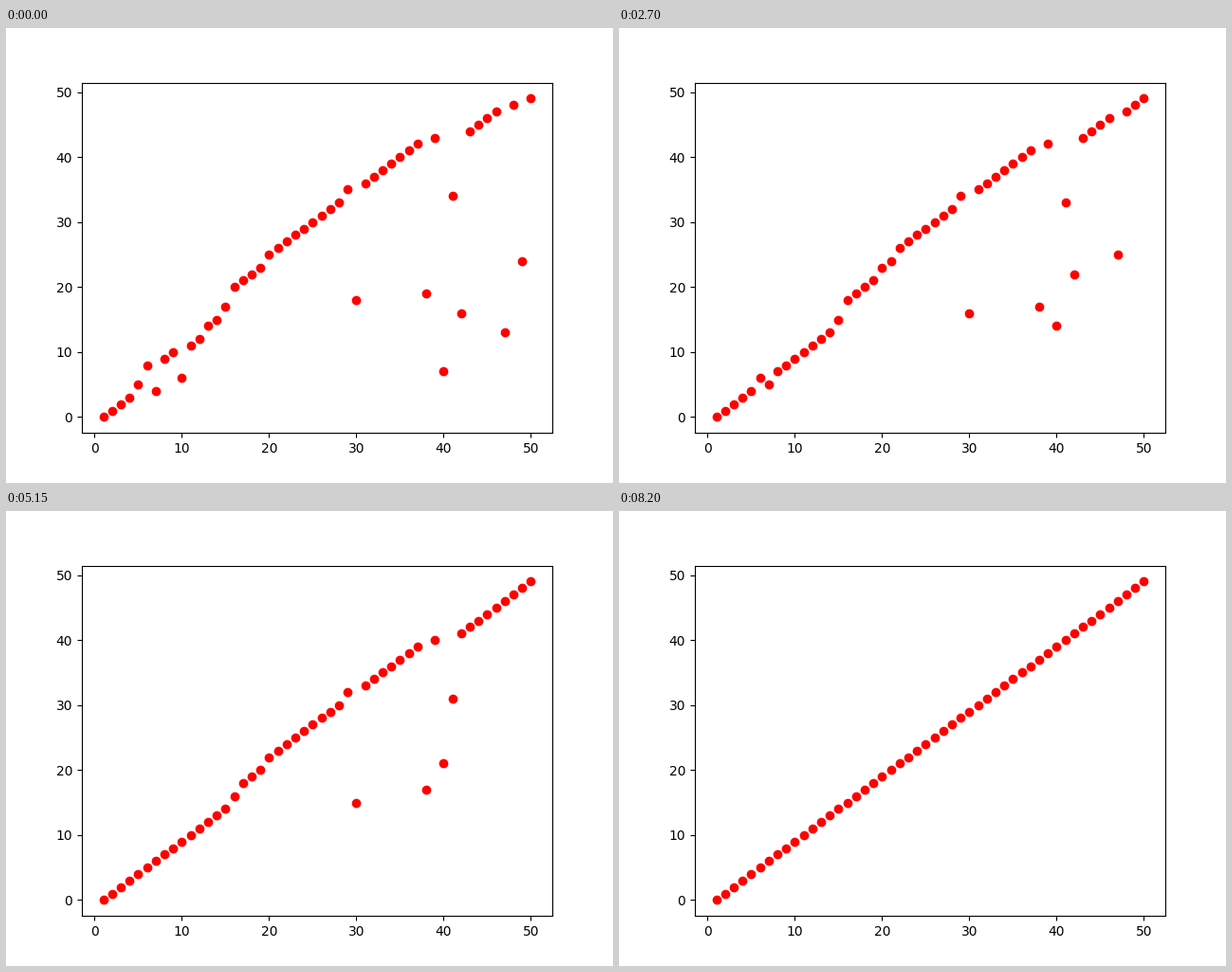
A matplotlib script for the animation above (8250 ms loop, 640 by 480 pixels).

```python
import matplotlib.pyplot as plt
from matplotlib.animation import FuncAnimation

N = 50
# Items out of order at the start: value -> position
STRAYS = {7: 4, 10: 6, 40: 7, 47: 13, 42: 16, 30: 18, 38: 19, 49: 24, 41: 34}


def start_order():
    items = [v for v in range(1, N + 1) if v not in STRAYS]
    for value, pos in sorted(STRAYS.items(), key=lambda s: s[1]):
        items.insert(pos, value)
    return items


def bubble_states(items):
    """Every state of a bubble sort, one swap apart."""
    items = list(items)
    states = [items[:]]
    for end in range(len(items) - 1, 0, -1):
        for j in range(end):
            if items[j] > items[j + 1]:
                items[j], items[j + 1] = items[j + 1], items[j]
                states.append(items[:])
    return states


states = bubble_states(start_order())

fig, ax = plt.subplots(figsize=(6.4, 4.8), dpi=100)
dots, = ax.plot(states[0], range(N), "ro")


def update(i):
    dots.set_data(states[i], range(N))
    return dots,


anim = FuncAnimation(fig, update, frames=len(states), interval=50,
                     repeat=True, repeat_delay=0)
plt.show()
```
